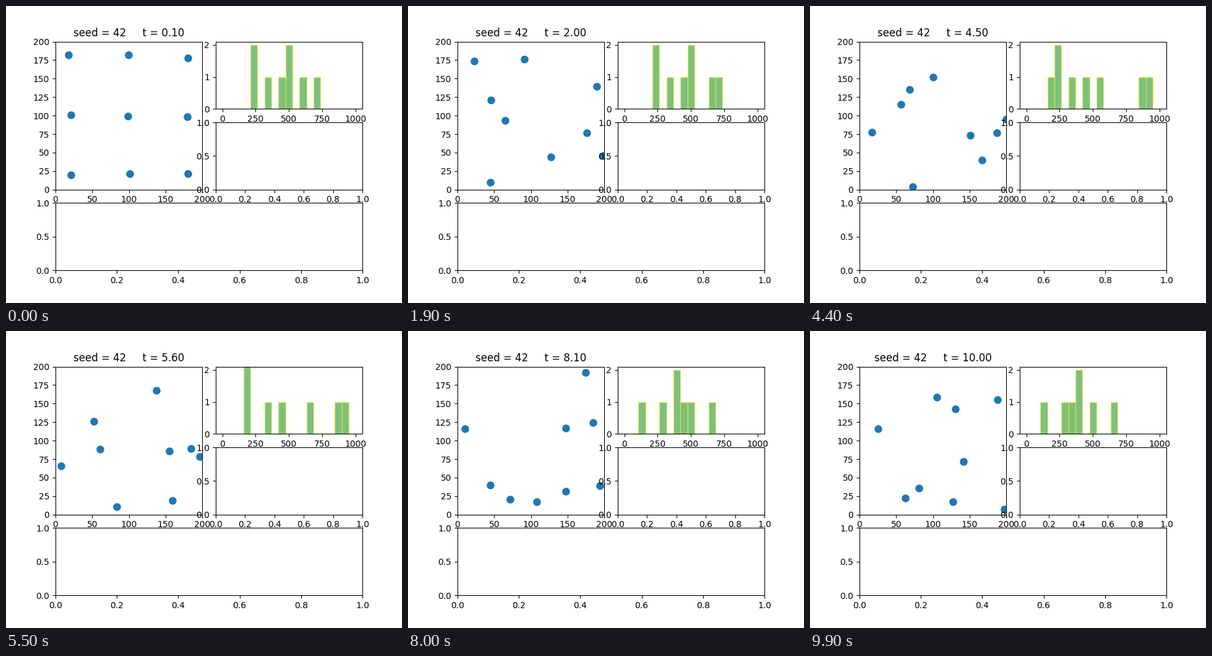
Write a matplotlib script that moves like this. It is 640 by 480 pixels and loops after 10000 ms.

```python
import numpy as np
import matplotlib.pyplot as plt
from matplotlib.animation import FuncAnimation

SEED = 42
FRAMES, INTERVAL = 100, 100
BOX = 200
MASS = 3
EDGES = np.linspace(0, 1000, 20)

# Particles start on a 3 x 3 lattice and glide through three waypoints each.
# A waypoint outside the box is reached by bouncing off the walls.
TIMES = np.array([0, 3.5, 6.7, 10])
LATTICE = [(x, y) for x in (20, 100, 180) for y in (20, 100, 180)]
WAYPOINTS = [
    [(62, 2), (94, -16), (127, -17)],
    [(72, 139), (176, 185), (295, 241)],
    [(-48, 261), (-65, 340), (-81, 436)],
    [(144, 62), (155, 99), (131, 143)],
    [(38, 86), (-28, 54), (-62, 22)],
    [(80, 252), (35, 281), (-25, 284)],
    [(209, 65), (216, 103), (212, 155)],
    [(172, 57), (153, -3), (142, -72)],
    [(196, 111), (206, 62), (203, 7)],
]
PATHS = np.array([[p, *way] for p, way in zip(LATTICE, WAYPOINTS)], float)
SLOPES = np.gradient(PATHS, TIMES, axis=1)


def glide(t):
    """Free-flight positions at time t, on cubic Hermite curves."""
    k = min(np.searchsorted(TIMES, t, side="right") - 1, len(TIMES) - 2)
    h = TIMES[k + 1] - TIMES[k]
    s = (t - TIMES[k]) / h
    return ((1 + 2 * s) * (1 - s) ** 2 * PATHS[:, k]
            + s * (1 - s) ** 2 * h * SLOPES[:, k]
            + s * s * (3 - 2 * s) * PATHS[:, k + 1]
            + s * s * (s - 1) * h * SLOPES[:, k + 1])


def fold(u):
    """Reflect free flight back into the box."""
    return BOX - np.abs(u % (2 * BOX) - BOX)


def kinetic(t, dt=0.01):
    velocity = (glide(t + dt) - glide(t - dt)) / (2 * dt)
    return MASS / 2 * (velocity ** 2).sum(axis=1)


fig = plt.figure(figsize=(6.4, 4.8), dpi=100)
grid = fig.add_gridspec(3, 4)
box = fig.add_subplot(grid[0:2, 0:2])
hist = fig.add_subplot(grid[0, 2:4])
fig.add_subplot(grid[1, 2:4])
fig.add_subplot(grid[2, :])

box.set(xlim=(0, BOX), ylim=(0, BOX))
title = box.set_title("")
dots, = box.plot([], [], "o", ms=8)

bars = hist.hist([], EDGES, lw=1, ec="yellow", fc="green", alpha=0.5)[2]
hist.set(xlim=(-50, 1050), ylim=(0, 2.1),
         xticks=range(0, 1001, 250), yticks=[0, 1, 2])


def update(i):
    t = (i + 1) * INTERVAL / 1000
    title.set_text(f"seed = {SEED}     t = {t:.2f}")
    dots.set_data(*fold(glide(t)).T)
    counts, _ = np.histogram(kinetic(t), EDGES)
    for bar, n in zip(bars, counts):
        bar.set_height(n)
    return title, dots, *bars


anim = FuncAnimation(fig, update, frames=FRAMES, interval=INTERVAL,
                     repeat=True, repeat_delay=0, blit=False)
plt.show()
```
